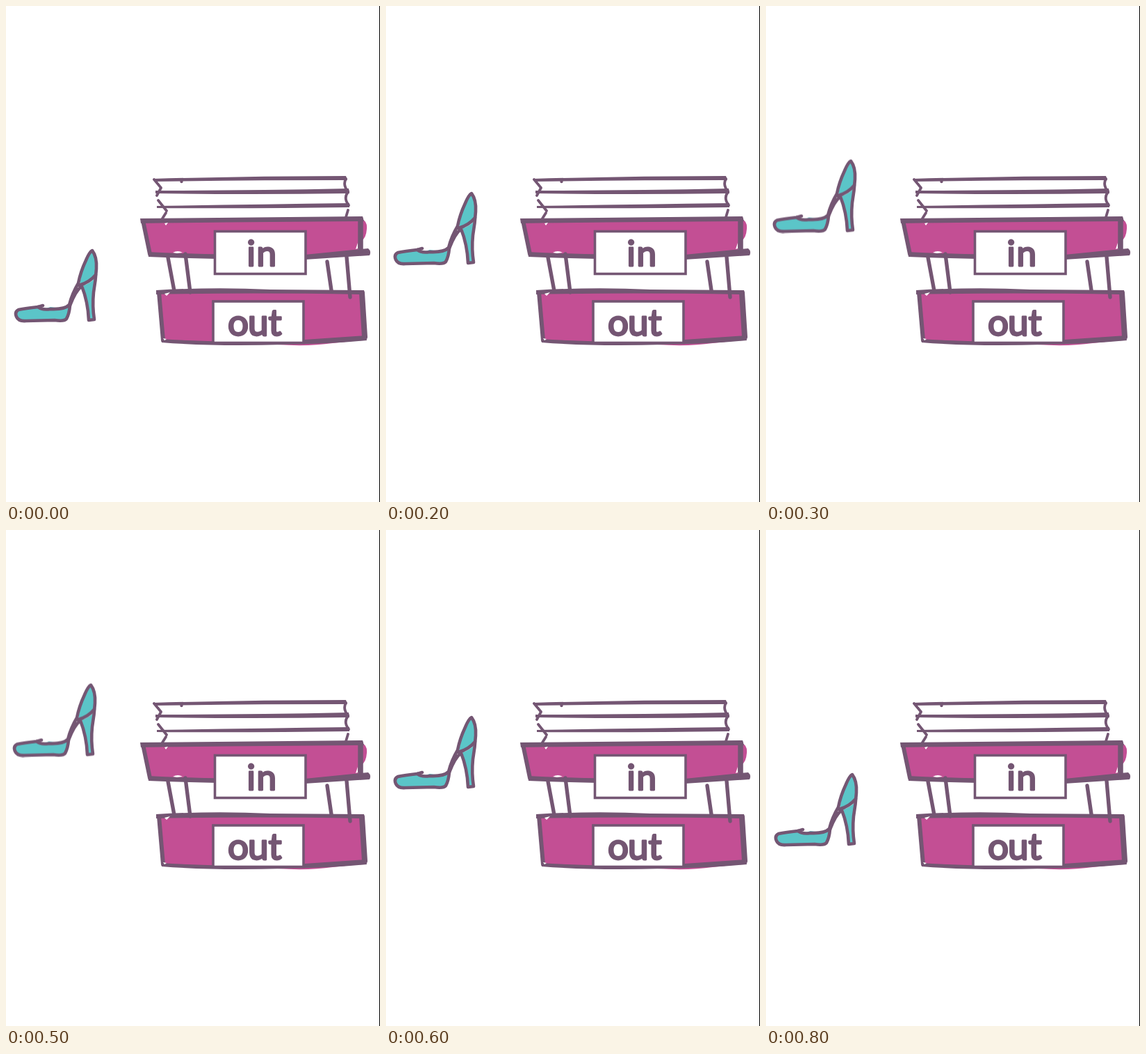
Animation, 538 px wide and 712 px high, one loop 900 ms. Source, as an HTML page:

```html
<!DOCTYPE html>
<html lang="en">
<head>
<meta charset="utf-8">
<title>In and out trays</title>
<style>
  html, body { margin: 0; width: 100%; height: 100%; overflow: hidden; background: #fff; }
  svg { display: block; width: 538px; height: 712px; }
  .ink { fill: none; stroke: #745673; stroke-linecap: round; stroke-linejoin: round; }
  .solid { fill: #745673; }
  .pink { fill: #c34f94; }
  .teal { fill: #5bc5c8; }
  .label { fill: #fff; stroke: #745673; stroke-width: 3.6; }
  text {
    font-family: Lato, "Open Sans", sans-serif;
    fill: #745673;
    stroke: #745673;
    stroke-width: 2.8;
    stroke-linejoin: round;
  }
  /* The shoe hops in nine held poses of 100 ms. */
  #shoe { animation: hop 900ms step-end infinite; }
  @keyframes hop {
    0%, 88.889%, 100% { transform: translate(0, 0); }
    11.111%, 77.778% { transform: translate(-.5px, -31px); }
    22.222%, 66.667% { transform: translate(-1px, -82px); }
    33.333%, 55.556% { transform: translate(-2px, -128.5px); }
    44.444% { transform: translate(-2px, -149px); }
  }
</style>
</head>
<body>
<svg viewBox="0 0 538 712">
  <!-- papers -->
  <g class="solid">
    <path d="M212 248 Q350 244 489 244 L491 250 Q350 250 214 252Z"/>
    <path d="M215 265 Q350 265 493 262 L494 269 Q350 271 215 269Z"/>
    <path d="M217 287 Q350 285 494 283 L494 289 Q350 291 217 290Z"/>
    <circle cx="252.5" cy="252" r="2.2"/>
  </g>
  <g class="ink" stroke-width="3.8">
    <path d="M213 249 L223 261 L217 272 M219 279 L231 294 M230 297 L225 305"/>
    <path d="M489 248 Q484 257 492 266 M492 267 Q485 276 493 286 M492 293 L489 303"/>
  </g>

  <!-- upper tray -->
  <path class="pink" d="M198 308 L512 306 Q520 309 519 320 Q518 334 511 337 L505 352 L430 360 L207 357Z"/>
  <g class="solid">
    <path d="M193 305 L513 302 L515 309 Q350 310 194 312Z"/>
    <path d="M204 353 Q300 358 430 357 L521 348 Q526 352 523 358 L430 364 Q300 364 205 360Z"/>
  </g>
  <path class="ink" stroke-width="6" d="M197 308 L207 356"/>
  <path class="ink" stroke-width="7.5" d="M510 306 L510 350"/>
  <path d="M228 312 L233 311 L230 315Z M240 354 Q247 350 254 354 L246 355Z M503 349 L506 340 L506 348Z" fill="#fff"/>
  <rect class="label" x="300.5" y="323.5" width="130.5" height="61"/>

  <!-- lower tray -->
  <path class="pink" d="M219 411 L514 411 L517 479 L470 484 Q435 489 390 486 L300 485 L226 481Z"/>
  <g class="solid">
    <path d="M216 408 Q300 403 380 407 L515 408 L516 414 Q350 411 216 414Z"/>
    <path d="M224 478 Q300 483 400 481 L518 473 L519 480 Q470 485 400 486 Q300 489 224 483Z"/>
  </g>
  <path class="ink" stroke-width="6" d="M220 411 L226 480"/>
  <path class="ink" stroke-width="8" d="M512 412 L516 475"/>
  <path d="M228 413 L236 411 L231 416Z M226 477 L231 478 L228 480Z" fill="#fff"/>
  <rect class="label" x="298" y="424" width="130" height="59.5"/>

  <!-- legs -->
  <path class="ink" stroke-width="5.4" d="M233 361 L242 409 M258 356 L265 411 M462 367 L468 408 M490 360 L495 418"/>

  <!-- lettering -->
  <text font-size="51" y="372.5" x="346.5 360.5">in</text>
  <text font-size="53" y="472.5" x="319 348 377.5">out</text>

  <g id="shoe">
    <path class="teal" d="M14 437 Q28 433 46 432 Q54 436 64 432 L80 434 Q88 434 93 428 Q92 441 87 450 Q83 452 70 451 L27 452 Q14 453 14 443Z"/>
    <path class="teal" d="M124 351 Q132 361 131 382 Q125 393 106 401 Q107 388 114 368 Q119 355 124 351Z"/>
    <path class="teal" d="M111 401 Q120 399 129 390 Q126 420 126 450 L119 450 Q118 425 111 401Z"/>
    <g class="ink" stroke-width="4.6">
      <path d="M53 430 L46 432 Q28 434 18 436 Q12 439 15 446 Q18 453 29 452 L70 451 Q84 453 87 449 Q91 442 92 430"/>
      <path d="M46 432 Q52 437 64 435 Q84 436 91 429 Q95 413 104 398 Q107 382 115 365 Q120 353 124 351 Q131 360 130 377 Q129 394 126 411 Q124 431 127 450 L119 451 Q118 425 109 402 Q100 409 92 430"/>
      <path d="M105 401 Q120 397 129 386"/>
    </g>
  </g>

  <rect x="537" width="1" height="712"/>
</svg>
</body>
</html>
```
